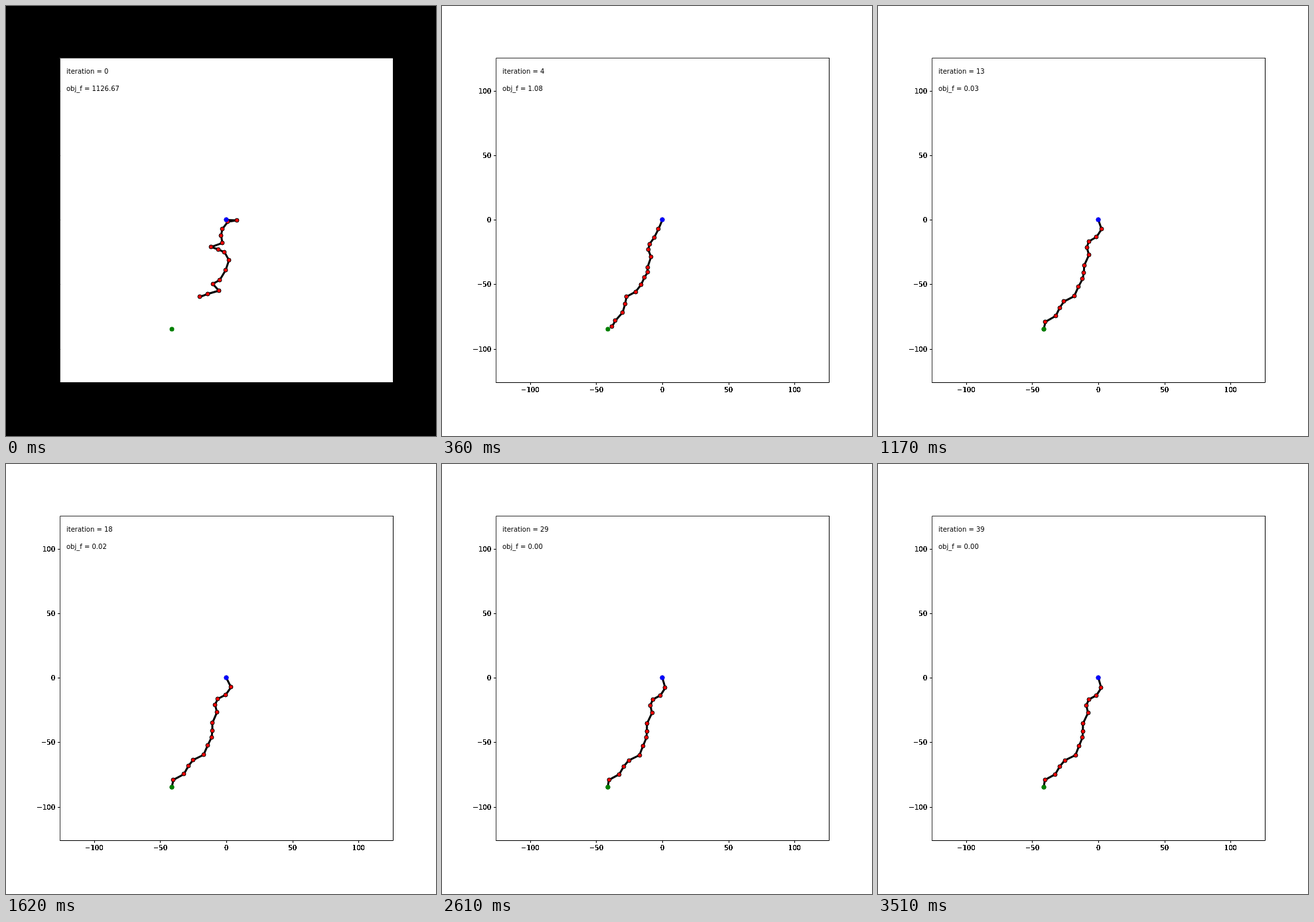
Write an HTML page that moves like this. It is 648x648 px and loops after 3600 ms.

```html
<!DOCTYPE html>
<html lang="en">
<head>
<meta charset="utf-8">
<title>Inverse kinematics</title>
<style>
html, body { margin: 0; width: 100%; height: 100%; overflow: hidden; background: #fff; }
svg { display: block; width: 648px; height: 648px; }
text { font: 10px "DejaVu Sans", sans-serif; white-space: pre; }
</style>
</head>
<body>
<svg viewBox="0 0 648 648">
  <filter id="hard" filterUnits="userSpaceOnUse" x="0" y="0" width="648" height="648">
    <feComponentTransfer><feFuncA type="discrete" tableValues="0 1 1 1"/></feComponentTransfer>
  </filter>
  <rect id="back" width="648" height="648"/>
  <rect x="81" y="78" width="502" height="489" fill="#fff"/>
  <path d="M81.5 567V78.5H583" fill="none" stroke="#333"/>
  <path d="M81 567.5H583.5V78" fill="none" stroke="#000"/>
  <g id="ticks" stroke="#000"></g>
  <g id="labels" filter="url(#hard)"></g>
  <text id="iter" x="91" y="102"></text>
  <text id="obj" x="91" y="128"></text>
  <polyline id="arm" fill="none" stroke="#000" stroke-width="3" stroke-linejoin="round" stroke-linecap="square"/>
  <g id="joints" fill="#f00" stroke="#000"></g>
  <circle cx="332" cy="322" r="3.5" fill="#00f"/>
  <circle cx="250" cy="487" r="3.5" fill="#008000"/>
</svg>
<script>
const STEP = 90, STEPS = 40;
const LINKS = [8, 7, 7, 5, 6, 9, 6, 5, 7, 8, 9, 6, 7, 9, 6];

const $ = id => document.getElementById(id);
const px = x => 332.1 + x * 1.993;
const py = y => 322.38 + y * 1.9414;
const mix = (a, b, e) => a + (b - a) * e;
const wave = (i, period) => Math.cos(2 * Math.PI * i / period);

function add(parent, tag, attrs, text = "") {
  const el = document.createElementNS("http://www.w3.org/2000/svg", tag);
  for (const key in attrs) el.setAttribute(key, attrs[key]);
  el.textContent = text;
  parent.append(el);
  return el;
}

// Joint positions from link directions, in degrees clockwise from the x axis
function chain(...dirs) {
  let x = 0, y = 0;
  const points = [[px(x), py(y)]];
  dirs.forEach((deg, i) => {
    const a = deg * Math.PI / 180;
    x += LINKS[i] * Math.cos(a);
    y += LINKS[i] * Math.sin(a);
    points.push([px(x), py(y)]);
  });
  return points;
}

// Moves the inner joints by offset(i); both ends stay where they are
function sway(points, offset, amount = 1) {
  return points.map(([x, y], i) => {
    if (i === 0 || i === LINKS.length) return [x, y];
    const [dx, dy] = offset(i);
    return [x + dx * amount, y + dy * amount];
  });
}

const ripple = i => [-6.5 - 6.5 * wave(i - 1, 8.5), 5 * wave(i - 4.25, 13)];
const bow = i => [-8 * wave(i, 60) - 3 * wave(i - 7, 6.5), 4 * wave(i, 60)];

const first = chain(2, 171, 126, 101, 81, 160, 20, 25, 62, 108, 120, 151, 49, 163, 159);
const second = chain(112, 125, 103, 156, 89, 81, 10, 100, 53, 160, 158, 93, 120, 87, 180);
const rest = chain(64, 124, 152, 113, 76, 113, 90, 96, 115, 113, 153, 127, 118, 151, 103);
const last = sway(rest, bow, 0.25);

const KEYS = [
  { at: 0, obj: 1126.67, pose: first },
  { at: 1, obj: 277.84, pose: second },
  { at: 9, obj: 0.18, pose: sway(rest, ripple) },
  { at: 18, obj: 0.02, pose: rest },
  { at: 25, obj: 0.01, pose: sway(rest, bow) },
  { at: 29, obj: 0.004, pose: last },
  { at: 39, obj: 0.001, pose: last }
];

for (let v = -100; v <= 100; v += 50) {
  const x = Math.round(px(v)), y = Math.round(py(-v));
  const text = String(v).replace("-", "\u2212");
  add($("ticks"), "path", { d: `M${x + 0.5} 567v4M82 ${y + 0.5}h-4` });
  add($("labels"), "text", { x: px(v), y: 582, "text-anchor": "middle" }, text);
  add($("labels"), "text", { x: 74, y: y + 4, "text-anchor": "end" }, text);
}

const dots = rest.map(() => add($("joints"), "circle", { r: 3 }));

function draw(n) {
  const k = KEYS.findIndex(key => key.at >= Math.max(n, 1));
  const a = KEYS[k - 1], b = KEYS[k];
  const e = 1 - (1 - (n - a.at) / (b.at - a.at)) ** 3;
  const points = a.pose.map((p, i) => p.map((v, j) => mix(v, b.pose[i][j], e)));

  $("back").setAttribute("fill", n ? "#fff" : "#000");
  $("iter").textContent = "iteration = " + n;
  $("obj").textContent = "obj_f = " + (a.obj * (b.obj / a.obj) ** e).toFixed(2);
  $("arm").setAttribute("points", points.join(" "));
  dots.forEach((dot, i) => {
    dot.setAttribute("cx", Math.round(points[i][0]));
    dot.setAttribute("cy", Math.round(points[i][1]));
  });
}

let start, shown = 0;
draw(0);
requestAnimationFrame(function tick(now) {
  start ??= now;
  const n = Math.floor((now - start) / STEP) % STEPS;
  if (n !== shown) draw(shown = n);
  requestAnimationFrame(tick);
});
</script>
</body>
</html>
```
